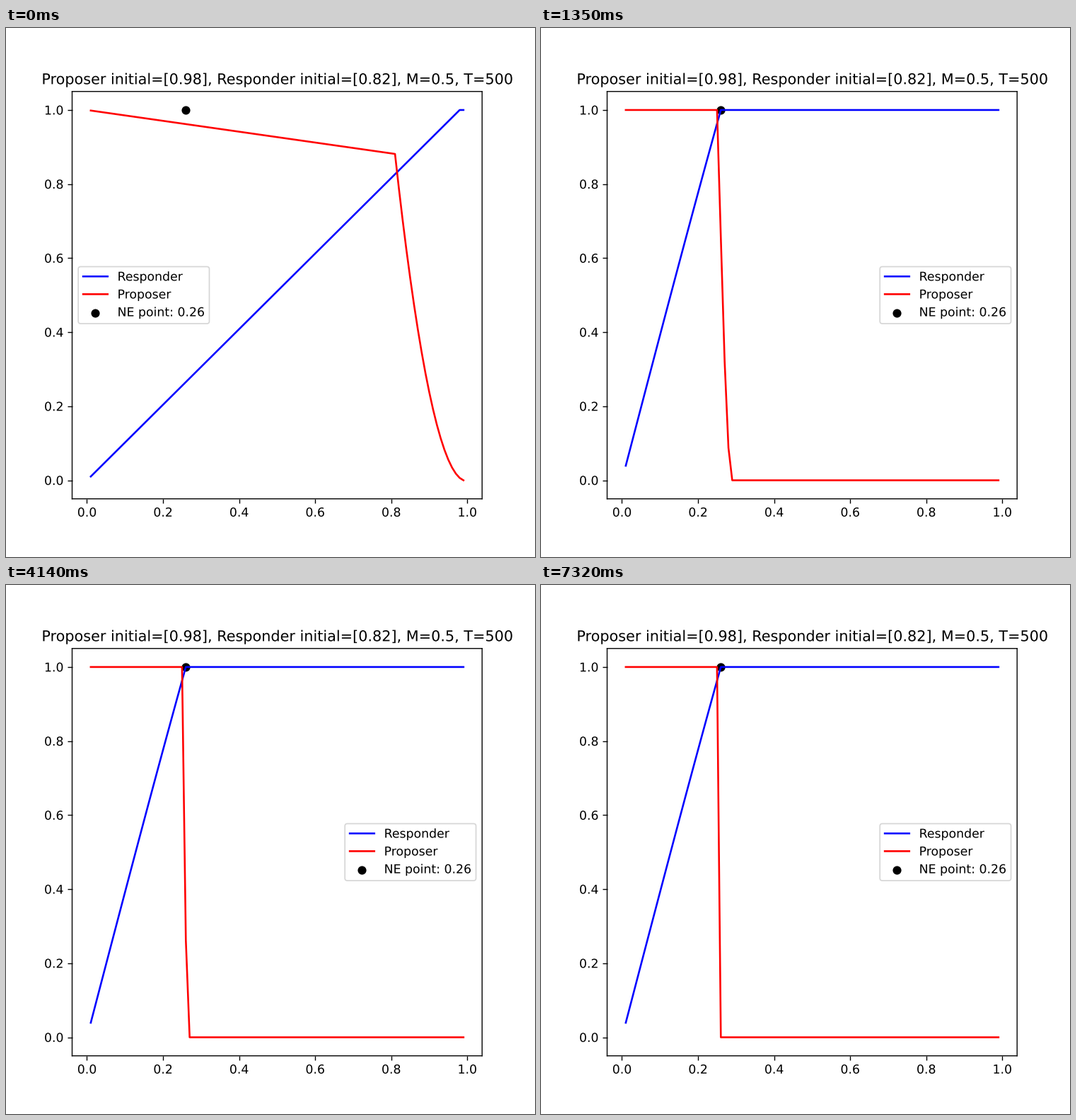
A matplotlib script for the animation above (8000 ms loop, 748 by 748 pixels).

```python
import numpy as np
import matplotlib.pyplot as plt
from matplotlib.animation import FuncAnimation
from matplotlib.patheffects import Normal

SIZE = 748
LOOP_MS = 8000
FRAMES = 267
STEPS = 245
RATE = 0.5
OFFER_0, DEMAND_0 = 0.98, 0.82
NE = 0.26

# Place lines and glyph outlines at exact positions, not on whole pixels
plt.rcParams.update({
    "path.snap": False,
    "path.effects": [Normal()],
    "text.hinting": "no_hinting",
})

grid = np.arange(1, 100) / 100


def point_mass(value):
    return (np.arange(1, 100) == round(value * 100)).astype(float)


def project(v):
    """Euclidean projection onto the probability simplex."""
    u = np.sort(v)[::-1]
    shift = (np.cumsum(u) - 1) / np.arange(1, len(v) + 1)
    return np.maximum(v - shift[u > shift][-1], 0)


def play(steps):
    """Both players follow the regularised leader in the ultimatum game."""
    proposer, responder = point_mass(OFFER_0), point_mass(DEMAND_0)
    gain_p, gain_r = np.zeros(99), np.zeros(99)
    history = []
    for _ in range(steps):
        gain_p += (1 - grid) * np.cumsum(responder)
        gain_r += np.cumsum((grid * proposer)[::-1])[::-1]
        proposer, responder = project(RATE * gain_p), project(RATE * gain_r)
        history.append((np.cumsum(responder), 1 - np.cumsum(proposer)))
    return history


history = play(STEPS)

fig, ax = plt.subplots(figsize=(6, 6), dpi=SIZE / 6)
accept_line, = ax.plot(grid, history[0][0], color="blue", label="Responder")
offer_line, = ax.plot(grid, history[0][1], color="red", label="Proposer")
ax.scatter([NE], [1], color="black", label=f"NE point: {NE}")
ax.set_xlim(-0.039, 1.039)
ax.set_ylim(-0.05, 1.05)
ax.set_title(f"Proposer initial=[{OFFER_0}], Responder initial=[{DEMAND_0}], "
             f"M={RATE}, T=500")
# "best" is worked out anew on every draw, so the box moves out of the way
ax.legend(loc="best")


def update(i):
    accept, offer = history[min(i, STEPS - 1)]
    accept_line.set_ydata(accept)
    offer_line.set_ydata(offer)
    return accept_line, offer_line


anim = FuncAnimation(fig, update, frames=FRAMES, interval=LOOP_MS / FRAMES,
                     init_func=lambda: update(0), repeat=True, repeat_delay=0)
plt.show()
```
